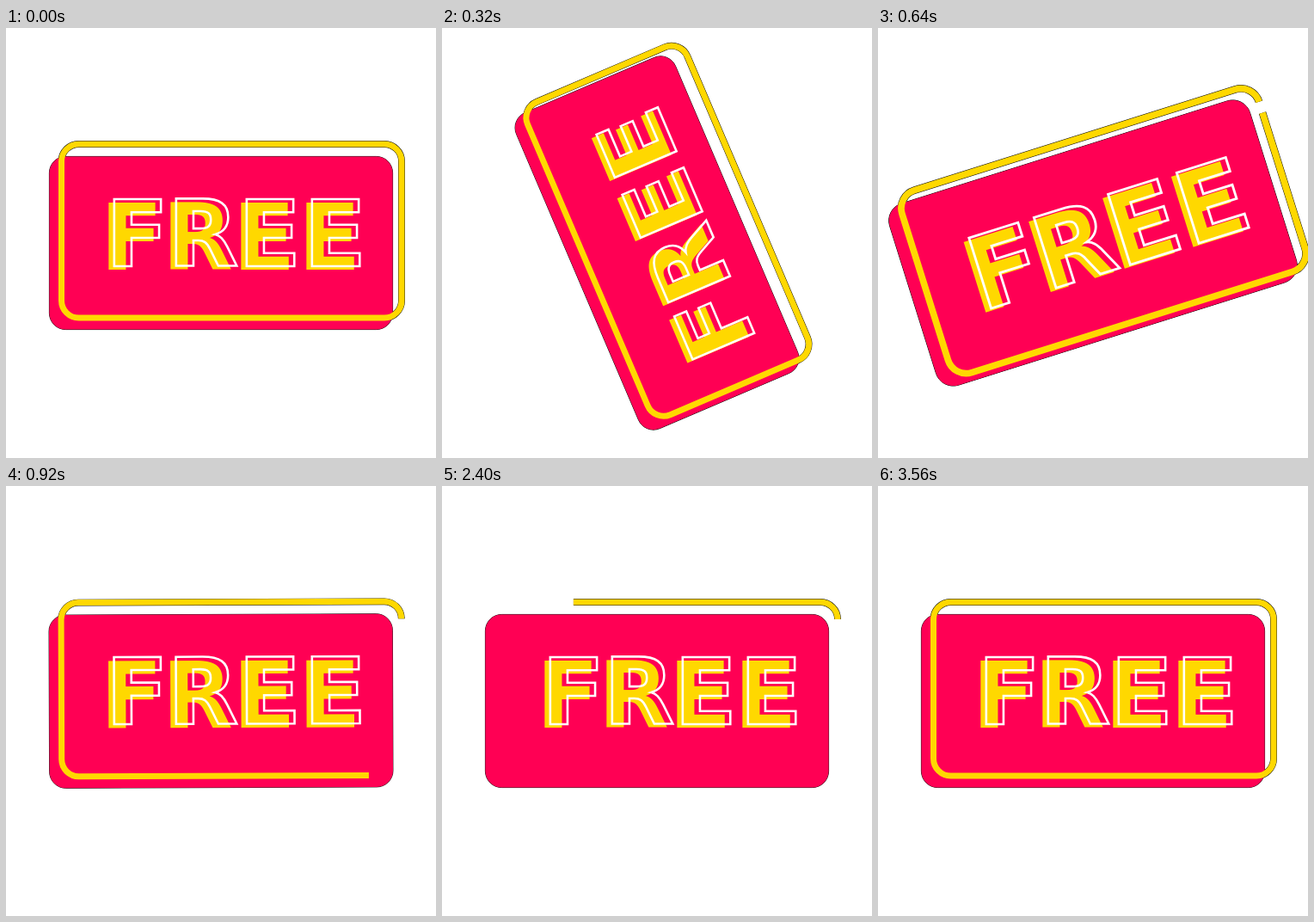
An HTML page that plays this animation: 500 px wide and 500 px high, repeating every 4.24 s.

```html
<!DOCTYPE html>
<html lang="en">
<head>
<meta charset="utf-8">
<title>Free badge</title>
<style>
  html, body { margin: 0; width: 100%; height: 100%; overflow: hidden; background: #fff; }
  svg { display: block; width: 100vw; height: 100vh; }
  text { font: bold 107px "DejaVu Sans", sans-serif; }
  .solid { fill: #ffd800; }
  .outline { fill: none; stroke: #fff; stroke-width: 2.6; }
  .line { fill: none; stroke: #ffd800; stroke-width: 7; }
  .line.edge { stroke: #000; stroke-width: 7.8; }
  .card { fill: #ff0054; }
  .card.edge { fill: #000; stroke: #000; stroke-width: .8; }
</style>
</head>
<body>
<svg viewBox="0 0 500 500">
  <defs>
    <rect id="card" x="50.4" y="149.4" width="399.2" height="201.2" rx="19"/>
    <path id="line" pathLength="1" d="M460 155a20 20 0 0 0-20-20H84.5a20 20 0 0 0-20 20V317a20 20 0 0 0 20 20H440a20 20 0 0 0 20-20Z"/>
  </defs>
  <g class="spin" data-pivot="262.25 236"><use href="#line" class="line edge"/></g>
  <g class="spin" data-pivot="250 250">
    <use href="#card" class="card edge"/>
    <use href="#card" class="card"/>
  </g>
  <g class="spin" data-pivot="262.25 236"><use href="#line" class="line"/></g>
  <g class="spin" data-pivot="264 241.5"><text class="solid" x="109.5 181.5 263.5 339.5" y="281">FREE</text></g>
  <g class="spin" data-pivot="270.3 237.3"><text class="outline" x="116 188 270 346" y="276.5">FREE</text></g>
</svg>
<script>
const LOOP = 4240, STEP = 40;
const layers = [...document.querySelectorAll('.spin')];
const line = document.getElementById('line');

// Bezier ease with resting ends; a and b are the lengths of its two handles.
function ease(x, a, b) {
  if (x <= 0) return 0;
  if (x >= 1) return 1;
  let lo = 0, hi = 1;
  for (let i = 0; i < 30; i++) {
    const u = (lo + hi) / 2, v = 1 - u;
    if (3 * u * v * v * a + 3 * u * u * v * (1 - b) + u * u * u < x) lo = u;
    else hi = u;
  }
  return lo * lo * (3 - 2 * lo);
}

const span = (n, from, to, a, b) => ease((n - from) / (to - from), a, b);

// n counts steps of 40 ms
function draw(n) {
  const angle = 360 * span(n, 0, 24, 1 / 3, 1);
  const scale = 1 + 0.1 * (span(n, 12, 16, 1 / 3, 1) - span(n, 16, 24, 1 / 3, 1));
  for (const layer of layers) {
    const [x, y] = layer.dataset.pivot.split(' ');
    layer.setAttribute('transform',
      `translate(${x} ${y}) rotate(${angle}) scale(${scale}) translate(${-x} ${-y})`);
  }
  const shown = 1 - span(n, 14, 47, 1 / 3, 1 / 3) + span(n, 47, 89, 1 / 6, 1 / 6);
  line.setAttribute('stroke-dasharray', shown < 1 ? `${shown} 2` : 'none');
  line.setAttribute('visibility', shown > 0.0005 ? 'visible' : 'hidden');
}

const start = performance.now();
function tick() {
  draw(Math.floor(((performance.now() - start) % LOOP) / STEP));
  requestAnimationFrame(tick);
}
draw(0);
requestAnimationFrame(tick);
</script>
</body>
</html>
```
